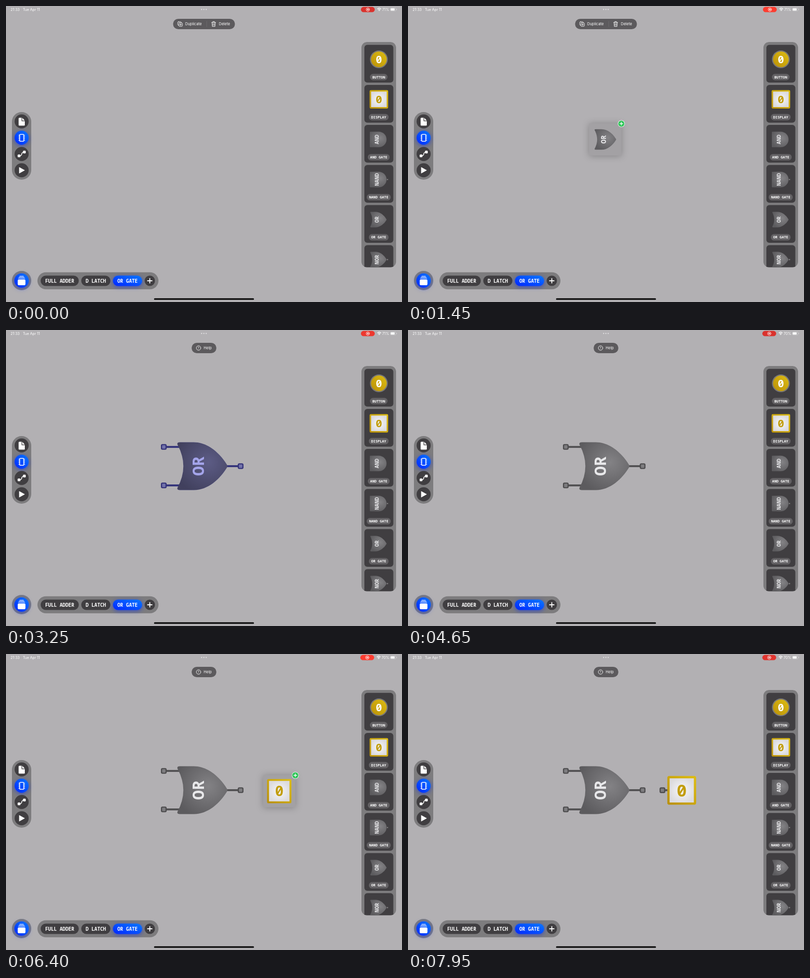
An HTML page for the animation above (8 s loop, 800x600 px).

```html
<!DOCTYPE html>
<html lang="en">
<head>
<meta charset="utf-8">
<title>Logic gate editor</title>
<style>
  html, body { margin: 0; width: 100%; height: 100%; overflow: hidden; background: #b2b0b3; }
  svg { display: block; width: 100%; height: 100%; }
  text { font-family: Inter, "Open Sans", sans-serif; fill: #fff; }
  .mono { font-family: "Noto Sans Mono", "DejaVu Sans Mono", monospace; font-weight: 700; text-anchor: middle; }
  .bar { fill: #7d7c7e; }
  .dark { fill: #403e41; }
  .active { fill: url(#blue); filter: drop-shadow(0 2px 4px rgba(0, 40, 255, .55)); }
  .line { fill: none; stroke: #fff; stroke-linecap: round; stroke-linejoin: round; }
  .part { isolation: isolate; --tint: 0%; }
  .wire { stroke: color-mix(in srgb, #1a1aa5 var(--tint), #545355); stroke-width: 4; }
  .pin { stroke: color-mix(in srgb, #1a1aa5 var(--tint), #4d4c4e); stroke-width: 2.4;
         fill: color-mix(in srgb, #6868d8 var(--tint), #7e7d80); }
  .tint { fill: #8080ff; mix-blend-mode: multiply; opacity: 0; }
  .shadow { filter: drop-shadow(0 1px 7px rgba(0, 0, 0, .25)); }
</style>
</head>
<body>
<svg id="stage" viewBox="0 0 800 600"></svg>
<script>
const LOOP = 8000;
const OR_PATH = 'M-50-44Q-51-48.5-45-48.5H-17C12-48.5 36-26 50-3Q52 0 50 3C36 26 12 48.5-17 48.5H-45Q-51 48.5-50 44Q-26 0-50-44Z';
const AND_PATH = 'M-53-45Q-53-48.5-49-48.5H2A49 48.5 0 0 1 2 48.5H-49Q-53 48.5-53 45Z';

const box = (x, y, w, h, r, attrs) => `<rect x="${x}" y="${y}" width="${w}" height="${h}" rx="${r}" ${attrs}/>`;
const disc = (x, y, r, attrs) => `<circle cx="${x}" cy="${y}" r="${r}" ${attrs}/>`;
const group = (x, y, s, body) => `<g transform="translate(${x} ${y}) scale(${s})">${body}</g>`;
const mono = (x, y, size, str, attrs = '') =>
  `<text class="mono" x="${x}" y="${y}" dy=".36em" font-size="${size}" ${attrs}>${str}</text>`;
const sans = (x, y, size, str, attrs = '') =>
  `<text x="${x}" y="${y}" dy=".36em" font-size="${size}" ${attrs}>${str}</text>`;

function gate(name) {
  const round = name.endsWith('OR');
  return (name[0] === 'N' ? disc(57, 0, 4, 'fill="#858486"') : '') +
    `<path d="${round ? OR_PATH : AND_PATH}" fill="url(#metal)"/>` +
    `<g transform="translate(-8.5 0) rotate(-90)">${mono(0, 0, 33, name, 'style="fill:#e8e8ea"')}</g>`;
}
const display = () => box(-26.8, -26.8, 53.6, 53.6, 1.5, 'fill="url(#white)" stroke="url(#gold)" stroke-width="4.6"') +
  mono(0, 0, 34, '0', 'style="fill:#c29d0c"');
const button = () => disc(0, 0, 18, 'fill="#777678"') + disc(0, 0, 15.8, 'fill="url(#gold)"') + mono(0, 0, 21, '0');

function card(i, label, icon) {
  const y = 78.7 + 81.2 * i, w = label.length * 4.35 + 9.5;
  return box(724, y, 58.5, 76.5, 6, 'class="dark"') + icon(y + 29.4) +
    box(753 - w / 2, y + 58.8, w, 13, 6.5, 'fill="#636164"') + mono(753, y + 65.2, 7.25, label);
}
const gateCard = (i, name) => card(i, name + ' GATE', y => group(752.2, y, .325, gate(name)));

function pill(x, w, label, cls) {
  return box(x, 546.5, w, 21, 10.5, `class="${cls}"`) + mono(x + w / 2, 557, 9.75, label);
}
const pin = (x, y) => box(x - 4.6, y - 4.6, 9.2, 9.2, 2, 'class="pin"');
const wire = (x1, x2, y) => `<path class="wire" d="M${x1} ${y}H${x2}"/>`;

function preview(id, icon) {
  return `<g id="${id}"><g class="shadow">${box(-32.5, -32.5, 65, 65, 1, 'fill="#a3a1a4" class="back"')}</g>${icon}
    <g class="badge">${disc(0, 0, 7, 'fill="#fff"')}${disc(0, 0, 6.2, 'fill="#2fc458"')}
    <path class="line" stroke-width="1.3" d="M-3 0H3M0-3V3"/></g></g>`;
}

const defs = `<defs>
  <linearGradient id="blue" x1="1" y1="0" x2="0" y2="1"><stop stop-color="#0a78ff"/><stop offset="1" stop-color="#0026ff"/></linearGradient>
  <linearGradient id="gold" x1="1" y1="0" x2="0" y2="1"><stop stop-color="#dcbc14"/><stop offset="1" stop-color="#bb9108"/></linearGradient>
  <radialGradient id="white"><stop stop-color="#f6f6f8"/><stop offset="1" stop-color="#dcdbde"/></radialGradient>
  <radialGradient id="metal" cx=".62" cy=".42" r=".68"><stop stop-color="#838285"/><stop offset="1" stop-color="#5c5b5e"/></radialGradient>
  <clipPath id="panel">${box(718, 73, 70, 456.5, 11, '')}</clipPath>
</defs>`;

const status = sans(9.3, 7, 7.2, '21:33') + sans(34, 7, 7.2, 'Tue Apr 11') +
  [395.2, 399.8, 404.4].map(x => disc(x, 7, 1.2, 'fill="#dddcde"')).join('') +
  `<g id="indicators">${box(717, 1.8, 28, 10.8, 5.4, 'id="record"')}
    ${disc(731, 7.2, 3.3, 'class="line" stroke-width=".9"')}${disc(731, 7.2, 1.4, 'fill="#fff"')}
    <path class="line" stroke-width="1.2" d="M750.6 5.8Q754 2.7 757.4 5.8M752.2 7.7Q754 6 755.8 7.7"/>${disc(754, 9.2, .9, 'fill="#fff"')}
    ${sans(760, 7, 7.2, '71%', 'id="charge"')}</g>
  ${box(776.5, 4, 11.5, 6, 1.8, 'fill="none" stroke="#d2d1d3" stroke-width=".7"')}
  ${box(777.3, 4.8, 7.8, 4.4, 1, 'fill="#fff"')}<path d="M789.2 6v2" stroke="#d2d1d3"/>`;

const toolbar = box(337.5, 26, 125, 21, 10.5, 'id="toolbar" fill="#5c5a5d"') +
  `<g id="editTools"><path d="M405.5 30.5V42.5" stroke="#737174" stroke-width=".7"/>
    <g class="line" stroke-width=".9">${box(347, 32, 7, 7, 1.4, '')}${box(349.3, 34.2, 7, 7, 1.4, 'fill="#5c5a5d"')}
    <path d="M351 37.7H354.6M352.8 35.9V39.5M415.3 33.3H423.7M417.8 33V31.6H421.2V33M416.2 33.5L416.8 41.5H422.2L422.8 33.5M418.3 35.3V39.5M420.7 35.3V39.5"/></g>
    ${sans(362, 36.5, 7.5, 'Duplicate')}${sans(430, 36.5, 7.5, 'Delete')}</g>
  <g id="helpTool">${disc(389, 36.5, 4.5, 'class="line" stroke-width=".9"')}
    ${sans(389, 36.4, 6.5, '?', 'text-anchor="middle"')}${sans(399.3, 36.5, 7.5, 'Help')}</g>`;

const sidebar = box(12, 215, 39, 137, 19.5, 'class="bar"') +
  [234, 267, 300, 333].map((y, i) => disc(31.6, y, 14.2, `class="${i === 1 ? 'active' : 'dark'}"`)).join('') +
  `<path fill="#fff" d="M27 226.5H31.5V233.5H38V241Q38 242.5 36.5 242.5H27Q25.5 242.5 25.5 241V228Q25.5 226.5 27 226.5ZM32.8 226.5L38 232.2H32.8Z"/>
  ${box(27.6, 260.3, 8.4, 14, 1.5, 'class="line" stroke-width="1.6"')}
  <path class="line" stroke-width="1.2" d="${[262, 265.5, 269, 272.5].map(y => `M25.6 ${y}h1M37 ${y}h1`).join('')}"/>
  <path class="line" stroke-width="1.6" d="M27 303.8C35 304 28.5 296.3 36.5 296.2"/>
  ${box(23.5, 301, 5.6, 5.6, 1.5, 'fill="#fff"')}${box(34.3, 293.2, 5.6, 5.6, 1.5, 'fill="#fff"')}
  <path fill="#fff" d="M26.5 326.5V339.5L38.2 333Z"/>`;

const footer = disc(31.5, 556.5, 19.5, 'class="bar"') + disc(31.5, 556.5, 14.5, 'class="active"') +
  box(23.7, 554.2, 15.6, 11.8, 2.2, 'fill="#fff"') +
  `<path class="line" stroke-width="1" d="M25 552H38M26.3 549.8H36.7M27.8 547.7H35.2"/>` +
  box(63.5, 539.8, 244.5, 34.4, 17.2, 'class="bar"') +
  pill(70, 77, 'FULL ADDER', 'dark') + pill(152, 59, 'D LATCH', 'dark') + pill(216, 59, 'OR GATE', 'active') +
  disc(290.5, 557, 10.5, 'class="dark"') +
  `<path class="line" stroke-width="1.8" d="M286 557H295M290.5 552.5V561.5"/>` +
  box(299, 592.4, 202, 3, 1.5, 'fill="#000"');

const palette = `<g clip-path="url(#panel)">${box(718, 73, 70, 457, 11, 'class="bar"')}
  ${card(0, 'BUTTON', y => group(753.3, y, 1, button()))}
  ${card(1, 'DISPLAY', y => group(753.3, y, .645, display()))}
  ${['AND', 'NAND', 'OR', 'NOR'].map((name, i) => gateCard(i + 2, name)).join('')}</g>`;

const parts = `<g id="gatePart" class="part">
    ${wire(-73, -1, -39)}${wire(-73, -1, 39)}${wire(5, 73, 0)}
    ${pin(-77.5, -39)}${pin(-77.5, 39)}${pin(77.7, 0)}
    <g class="body">${gate('OR')}<path class="tint" d="${OR_PATH}"/></g></g>
  <g id="displayPart" class="part">${wire(-35, -28, -.3)}${pin(-39, -.3)}
    <g class="body">${display()}${box(-29.1, -29.1, 58.2, 58.2, 2, 'class="tint"')}</g></g>`;

const stage = document.getElementById('stage');
stage.innerHTML = defs + status + toolbar + sidebar + footer + parts + palette +
  preview('gateDrag', group(0, 0, .43, gate('OR'))) + preview('displayDrag', group(0, 0, .845, display()));

const el = id => document.getElementById(id);
const clamp = v => Math.max(0, Math.min(1, v));
const ramp = (t, a, b) => { const p = clamp((t - a) / (b - a)); return p * p * (3 - 2 * p); };

// Linear interpolation through [time, value, ...] rows.
function track(t, rows) {
  const i = rows.findIndex(row => row[0] > t);
  if (i === 0) return rows[0].slice(1);
  if (i < 0) return rows.at(-1).slice(1);
  const a = rows[i - 1], b = rows[i], p = (t - a[0]) / (b[0] - a[0]);
  return a.slice(1).map((v, k) => v + (b[k + 1] - v) * p);
}

function drawDrag(id, t, { lift, path, badge, drop, from }) {
  const node = el(id), up = ramp(t, lift, lift + 250);
  const [x, y] = track(t, path);
  node.style.display = t >= lift && t < drop + 250 ? '' : 'none';
  node.style.opacity = 1 - ramp(t, drop, drop + 250);
  node.setAttribute('transform', `translate(${x} ${y}) scale(${from + (1 - from) * up})`);
  node.querySelector('.back').style.opacity = up;
  const b = clamp((t - badge) / 200), mark = node.querySelector('.badge');
  mark.setAttribute('transform', `translate(${32.5 - 28 * (1 - b)} ${-32 + 20 * (1 - b)}) scale(${.7 + .3 * b})`);
  mark.style.opacity = clamp(2 * b);
}

function drawPart(id, t, { x, y, show, snap, pins, body }) {
  const node = el(id), move = 1 - ramp(t, snap, snap + 100);
  const pulse = ([a, b, c, d]) => ramp(t, a, b) * (1 - ramp(t, c, d));
  node.style.display = t < show ? 'none' : '';
  node.style.opacity = ramp(t, show, show + 150);
  node.setAttribute('transform', `translate(${x - move} ${y + 2.3 * move})`);
  node.style.setProperty('--tint', pulse(pins) * 100 + '%');
  node.querySelector('.body').style.opacity = .85 + .15 * ramp(t, snap - 100, snap + 50);
  node.querySelector('.tint').style.opacity = pulse(body);
}

function draw(t) {
  const glow = track(t, [[0, 0], [700, 1], [2700, 1], [3600, .3], [4000, 1], [4650, 0], [5200, 1], [5750, .35],
    [6400, 1], [7100, 1], [7950, .2]])[0];
  el('record').setAttribute('fill', `rgb(${218 + 34 * glow},${50 + 10 * glow},${45 + 3 * glow})`);
  el('charge').textContent = t < 4350 ? '71%' : '70%';
  el('indicators').setAttribute('transform', `translate(${t < 4350 ? 0 : -1.2} 0)`);

  const swap = ramp(t, 2675, 2975), width = 125 - 75 * swap;
  el('toolbar').setAttribute('x', 400 - width / 2);
  el('toolbar').setAttribute('width', width);
  el('editTools').style.opacity = 1 - ramp(t, 2700, 2850);
  el('helpTool').style.opacity = ramp(t, 2800, 2975);

  drawDrag('gateDrag', t, { lift: 350, from: .75, badge: 1050, drop: 2250,
    path: [[850, 752.2, 433], [1000, 690, 398], [1250, 470, 300], [1450, 398.5, 270.5], [1850, 395, 278]] });
  drawDrag('displayDrag', t, { lift: 5120, from: .765, badge: 5600, drop: 6400,
    path: [[5400, 753.3, 189], [5750, 626.5, 228.5], [6150, 552, 278]] });

  drawPart('gatePart', t, { x: 396.3, y: 276, show: 2450, snap: 2790,
    pins: [2600, 2800, 3150, 3350], body: [2720, 2850, 3150, 3380] });
  drawPart('displayPart', t, { x: 553, y: 276.4, show: 6650, snap: 6900,
    pins: [6750, 7000, 7450, 7650], body: [6800, 7050, 7550, 7850] });
}

function frame(now) {
  draw(now % LOOP);
  requestAnimationFrame(frame);
}
draw(0);
requestAnimationFrame(frame);
</script>
</body>
</html>
```
